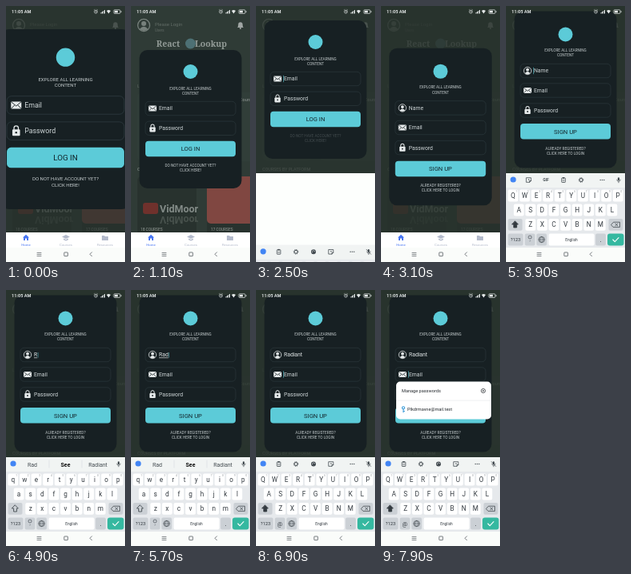
These frames come from a looping animation (149 px wide and 320 px high, 8000 ms). An HTML page:

```html
<!DOCTYPE html>
<html lang="en">
<head>
<meta charset="utf-8">
<title>Login and sign up</title>
<style>
html, body { margin: 0; width: 100%; height: 100%; overflow: hidden; background: #fff; }
svg { display: block; width: 100vw; height: 100vh; font-family: Roboto, sans-serif; }
</style>
</head>
<body>
<svg id="stage" viewBox="0 0 149 320"></svg>
<script>
const stage = document.getElementById('stage');
const LOOP = 8000, STEP = 100, CX = 74.5, FOLD = 209;
const CYAN = '#5ccbd8', PANEL = '#172023', SHADE = '#27312c', TEAL = '#35b8a0', INK = '#333a40';

const clamp = v => Math.max(0, Math.min(1, v));
const ramp = (t, a, b) => clamp((t - a) / (b - a));
const ease = v => v * v * (3 - 2 * v);

// Drawing helpers; text is placed by its vertical centre.
const rect = (x, y, w, h, fill, r = 0, more = '') =>
  `<rect x="${x}" y="${y}" width="${w}" height="${h}" rx="${r}" fill="${fill}" ${more}/>`;
const dot = (x, y, r, fill, more = '') =>
  `<circle cx="${x}" cy="${y}" r="${r}" fill="${fill}" ${more}/>`;
const line = (d, stroke, w = 0.8, fill = 'none') =>
  `<path d="${d}" fill="${fill}" stroke="${stroke}" stroke-width="${w}" stroke-linecap="round" stroke-linejoin="round"/>`;
const text = (x, y, str, size, fill, more = '') =>
  `<text x="${x}" y="${y + size * 0.36}" font-size="${size}" fill="${fill}" ${more}>${str}</text>`;
const mid = (x, y, str, size, fill, more = '') =>
  text(x, y, str, size, fill, 'text-anchor="middle" ' + more);
const group = (body, attrs) => `<g ${attrs}>${body}</g>`;
const at = (x, y, body) => group(body, `transform="translate(${x} ${y})"`);

const icons = {
  mail: c => rect(-5, -3.5, 10, 7, c, 0.8) + line('M-4.6-3L0 .8L4.6-3M-4.5 3L-1.6 0M4.5 3L1.6 0', PANEL, 0.7),
  lock: c => line('M-2.1-1V-2.8A2.1 2.1 0 0 1 2.1-2.8V-1', c, 1) + rect(-3.7, -1.4, 7.4, 6, c, 0.8) + dot(0, 1.5, 0.9, PANEL),
  user: c => dot(0, 0, 4.7, 'none', `stroke="${c}" stroke-width=".8"`) + dot(0, -1.3, 1.9, c) +
    `<path d="M-3.3 3.2Q0-1 3.3 3.2Q0 5.4-3.3 3.2" fill="${c}"/>`,
  bell: c => `<path d="M-4 3Q-2.7 2-2.7-1A2.7 2.7 0 0 1 2.7-1Q2.7 2 4 3Z" fill="${c}"/>` + dot(0, 4, 1, c),
  home: c => `<path d="M-4 0L0-3.7L4 0H3V3.5H1V1H-1V3.5H-3V0Z" fill="${c}"/>`,
  hat: c => `<path d="M-5-1L0-3.5L5-1L0 1.6Z M-3 1L0 2.5L3 1V2.7L0 4L-3 2.7Z" fill="${c}"/>`,
  box: c => `<path d="M-4-2.5H-1L0-1.5H4V3.5H-4Z" fill="${c}"/>`,
  clip: c => rect(-2.3, -2.6, 4.6, 5.6, 'none', 0.6, `stroke="${c}" stroke-width=".8"`) + rect(-1.2, -3.4, 2.4, 1.6, c) + line('M-1 0H1M-1 1.4H1', c, 0.5),
  gear: c => dot(0, 0, 2, 'none', `stroke="${c}" stroke-width="1"`) +
    dot(0, 0, 2.8, 'none', `stroke="${c}" stroke-width="1" stroke-dasharray="1.1 1.1"`),
  paint: c => dot(0, 0, 3, c) + [[-1.5, 0], [-0.5, -1.5], [1.3, -1]].map(p => dot(...p, 0.55, '#f1f3f5')).join(''),
  sticker: c => line('M-2.8-2.8H2.8V1L1 2.8H-2.8ZM2.8 1H1V2.8', c, 0.8) + dot(0, -0.5, 0.8, c),
  more: c => [-2.3, 0, 2.3].map(x => dot(x, 0, 0.7, c)).join(''),
  mic: c => rect(-1.1, -3.2, 2.2, 4, c, 1.1) + line('M-2.2-.4A2.2 2.2 0 0 0 2.2-.4M0 2V3.3', c, 0.7),
  muted: c => icons.mic(c) + line('M-2.8-3L2.8 3', c, 0.7),
  gif: c => mid(0, 0, 'GIF', 5, c, 'font-weight="700"'),
};
const icon = (name, x, y, color) => at(x, y, icons[name](color));

function page() {
  const soft = '#c2cac6', faint = '#7b857f', card = '#2a342f';
  const title = 'font-family="Noto Serif, serif" font-weight="700"';
  const brand = (y, fill) => text(36, y, 'VidMoor', 12.5, fill, 'font-weight="700"');
  return rect(0, 0, 149, 302, '#33403a') +
    `<g transform="translate(16 24) scale(1.6)">${icons.user('#9aa49f')}</g>` +
    text(30, 23, 'Please Login', 6, faint) + text(30, 30, 'Users', 4.5, faint) +
    icon('bell', 137, 24, '#d5dad8') +
    mid(46.5, 47, 'React', 10.5, soft, title) + dot(CX, 47, 6.5, '#5f8c94') + mid(100, 47, 'Lookup', 10.5, soft, title) +
    text(8, 100, 'LATEST COURSES', 5, faint) +
    rect(8, 108, 62, 86, '#37443f', 6) + rect(80, 108, 76, 86, '#37443f', 6) +
    text(136, 117, 'Courses', 5.5, soft) +
    text(8, 204, 'COURSES BY PLATFORM', 5.4, soft) +
    rect(8, 213, 74, 73, card, 5) + rect(15, 246, 19, 14, '#8f322d', 3) + brand(253, '#aab2ae') +
    group(brand(-267, '#56605a'), 'transform="scale(1 -1)"') +
    text(12, 279, '18 COURSES', 4.8, soft) +
    rect(95, 213, 60, 73, card, 5) + rect(95, 213, 60, 59, '#a8524a', 5) +
    text(100, 279, '17 COURSES', 4.8, soft);
}

function tabs() {
  const tab = (x, name, label, c) => icon(name, x, 289.5, c) + mid(x, 298.6, label, 4.3, c);
  return rect(0, 283, 149, 19, '#fff') + tab(25, 'home', 'Home', '#4775f2') +
    tab(75, 'hat', 'Courses', '#b3bacb') + tab(124, 'box', 'Resources', '#b3bacb');
}

function statusBar() {
  const c = '#e4e8e8';
  return text(7, 7, '11:05 AM', 5.6, c, 'font-weight="700"') +
    dot(112.5, 7.2, 1.9, 'none', `stroke="${c}" stroke-width=".7"`) + line('M112.5 6.2V7.3H113.4M110.3 5L111 4.4M114.7 5L114 4.4', c, 0.5) +
    [0, 1, 2, 3].map(i => rect(118.5 + i * 1.5, 8 - i, 1, 1.5 + i, c)).join('') +
    `<path d="M126 6Q128.5 3.8 131 6L128.5 9.5Z" fill="${c}"/>` +
    rect(135, 4.8, 8, 4.6, 'none', 1, `stroke="${c}" stroke-width=".7"`) + rect(136, 5.8, 4, 2.6, c) + rect(143.6, 6.1, 0.8, 2, c);
}

function navBar() {
  const c = '#555b60';
  return rect(0, 302, 149, 18, '#fafcfa') + line('M39 308.5H44M39 310.5H44M39 312.5H44', c, 0.7) +
    rect(72.8, 308, 4.6, 4.6, 'none', 0.5, `stroke="${c}" stroke-width=".8"`) + line('M107.5 307.8L105 310.3L107.5 312.8', c);
}

function field(y, name, label, value, focused, composing) {
  const caret = `<tspan fill="${CYAN}" text-decoration="none">|</tspan>`;
  const body = value
    ? text(35, y, (composing ? `<tspan text-decoration="underline">${value}</tspan>` : value) + (focused ? caret : ''), 6.8, '#e2e7e8')
    : text(35, y, label, 6.8, '#cfd6d8') + (focused ? rect(34.2, y - 4.2, 0.6, 8.4, CYAN) : '');
  return rect(18, y - 8.7, 113, 17.4, PANEL, 4.5, 'stroke="#2c383d" stroke-width=".7"') +
    icon(name, 27, y, '#e6eaeb') + body;
}

function panel(s) {
  const small = (y, str, o = 1) => mid(CX, y, str, 4.7, '#c7ced0', `opacity="${o}"`);
  const button = (y, label) => rect(18, y - 9.8, 113, 19.6, CYAN, 4) + mid(CX, y, label, 7.6, '#13262c');
  const sheet = h => rect(10.5, -h / 2, 128, h, PANEL, 10);
  let body;
  if (s.signup) {
    body = sheet(196) + dot(CX, -69, 9, CYAN) +
      small(-49.3, 'EXPLORE ALL LEARNING') + small(-43, 'CONTENT') +
      field(-23.5, 'user', 'Name', s.name, s.focus === 'name', s.composing) +
      field(1, 'mail', 'Email', '', s.focus === 'email') +
      field(26, 'lock', 'Password', '') + button(52.3, 'SIGN UP') +
      small(73.5, 'ALREADY REGISTERED?') + small(79.5, 'CLICK HERE TO LOGIN');
  } else {
    body = sheet(173) + dot(CX, -59.5, 9, CYAN) +
      small(-38.5, 'EXPLORE ALL LEARNING') + small(-32.5, 'CONTENT') +
      field(-13.5, 'mail', 'Email', '', s.focus === 'email') +
      field(11.3, 'lock', 'Password', '') + button(37, 'LOG IN') +
      small(57.5, 'DO NOT HAVE ACCOUNT YET?', s.press) + small(63.5, 'CLICK HERE!', s.press);
  }
  return group(body, `transform="translate(${CX} ${s.cy}) scale(${s.scale}) translate(${-CX} 0)"`);
}

function toolbar(s) {
  const c = '#454d52';
  const body = rect(0, FOLD, 149, 18, '#f1f4f3') + dot(9, 217, 3.6, '#4285f4');
  if (s.composing) {
    return body + mid(33, 218, 'Rad', 7, c) + mid(CX, 218, 'See', 7, '#111', 'font-weight="700"') +
      mid(115, 218, 'Radiant', 7, c) + line('M54 213V222M95 213V222', '#d3d7da', 0.5) + icon('mic', 141, 217.5, c);
  }
  const names = s.focus === 'email'
    ? ['clip', 'gear', 'paint', 'sticker', 'more', 'muted']
    : ['sticker', 'gif', 'clip', 'gear', 'more', 'mic'];
  const xs = [28.5, 50, 72, 94, 120.5, 141];
  return body + names.map((n, i) => icon(n, xs[i], 217.5, c)).join('');
}

function keyboard(s) {
  const gray = '#cbd0d5';
  const key = (x, y, w, label, fill = '#fff', size = 8.2) =>
    rect(x - w / 2, y - 7.4, w, 14.8, fill, 2) + mid(x, y, label, size, INK);
  const row = (letters, x0, y) => [...letters].map((ch, i) =>
    key(x0 + i * 14.6, y, 12.8, s.upper ? ch.toUpperCase() : ch)).join('');
  const hints = [...'1234567890'].map((n, i) => mid(13 + i * 14.6, 232.3, n, 3, '#8a9196')).join('');
  return rect(0, FOLD, 149, 111, '#e6e9ec') + toolbar(s) +
    row('qwertyuiop', 8.8, 237) + hints + row('asdfghjkl', 16.1, 255) + row('zxcvbnm', 30.7, 273.3) +
    key(11.5, 273.3, 18, '', gray) + line('M11.5 269L15.3 273H13.4V277H9.6V273H7.7Z', INK, 0.8, s.upper ? INK : 'none') +
    key(137.5, 273.3, 18, '', gray) + line('M131.8 273.3L134.5 270.2H142.5V276.4H134.5ZM137 272L139.8 274.8M139.8 272L137 274.8', INK, 0.7) +
    key(12, 292, 19, '?123', gray, 5.8) +
    (s.focus === 'email' ? key(30, 292, 12.8, '@', gray, 7)
      : key(30, 292, 12.8, ',', gray, 6) + dot(30, 289, 2, 'none', `stroke="${INK}" stroke-width=".6"`)) +
    key(44.6, 292, 12.8, '', gray) + dot(44.6, 292, 3.6, 'none', `stroke="${INK}" stroke-width=".7"`) +
    line('M41 292H48.2M44.6 288.4Q41 292 44.6 295.6Q48.2 292 44.6 288.4', INK, 0.5) +
    key(82, 292, 57, 'English', '#fff', 4.8) + key(118.5, 292, 12.8, '.', gray) +
    rect(127, 284.6, 20.5, 14.8, TEAL, 3) + line('M133.8 292L136.3 294.6L141 289.6', '#fff', 1.1) + navBar();
}

function popup() {
  const c = '#24292d', blue = '#3b9bd8';
  return rect(19, 114.5, 119, 47, '#fff', 5) + text(26, 126, 'Manage passwords', 5.6, c) +
    dot(128, 126, 2.6, 'none', `stroke="${c}" stroke-width=".7"`) +
    line('M127 125L129 127M129 125L127 127', c, 0.6) + rect(19, 137.8, 119, 0.5, '#dfe2e4') +
    dot(28, 147.3, 1.6, 'none', `stroke="${blue}" stroke-width="1.1"`) + line('M28 149V153M28 151.5H29.5', blue, 1) +
    text(33, 149.3, 'Plkdrmavne@mail.test', 5.6, c);
}

function state(t) {
  const signup = t >= 2700;
  const opened = signup ? t - 2700 : t;
  const up = (t >= 1900 && t < 2600) || t >= 3600;
  const key = signup ? ease(ramp(t, 3600, 3900)) : ease(ramp(t, 1900, 2200)) * (1 - ramp(t, 2390, 2526));
  const typed = 'Rad'.slice(0, (t >= 4900) + (t >= 5200) + (t >= 5500));
  const name = t >= 6300 ? 'Radiant' : typed;
  const focus = t >= 6900 || (!signup && up) ? 'email' : signup && up ? 'name' : '';
  return {
    signup, up, key, name, focus,
    composing: typed !== '' && t < 6300,
    upper: !typed || t >= 6900,
    scale: 1 + 0.3 * Math.exp(-opened / 90),
    cy: up ? 104.5 : signup ? 151 : 141.5,
    press: t >= 2300 && t < 2700 ? 0.25 : 1,
    dim: 0.8 - 0.5 * ease(ramp(t, 0, 700)) + 0.5 * ease(ramp(t, 1200, 1900)) + 0.08 * ramp(t, 2700, 3100),
    popup: t >= 7400,
  };
}

function draw(t) {
  const s = state(t);
  const bottom = s.up ? FOLD : s.signup ? 302 : 283;
  const view = page() + rect(0, 0, 149, 302, SHADE, 0, `opacity="${s.dim}"`);
  stage.innerHTML = `<clipPath id="view"><rect width="149" height="${bottom}"/></clipPath>` +
    rect(0, 0, 149, 320, '#fdfffd') + group(view, 'clip-path="url(#view)"') +
    (s.up ? '' : tabs()) + group(panel(s), 'clip-path="url(#view)"') + statusBar() + navBar() +
    (s.key > 0 ? at(0, 111 * (1 - s.key), keyboard(s)) : '') +
    (s.popup ? popup() : '');
}

let last = -1;
function tick(now) {
  const t = Math.floor((now % LOOP) / STEP) * STEP;
  if (t !== last) draw(last = t);
  requestAnimationFrame(tick);
}
draw(0);
requestAnimationFrame(tick);
</script>
</body>
</html>
```
